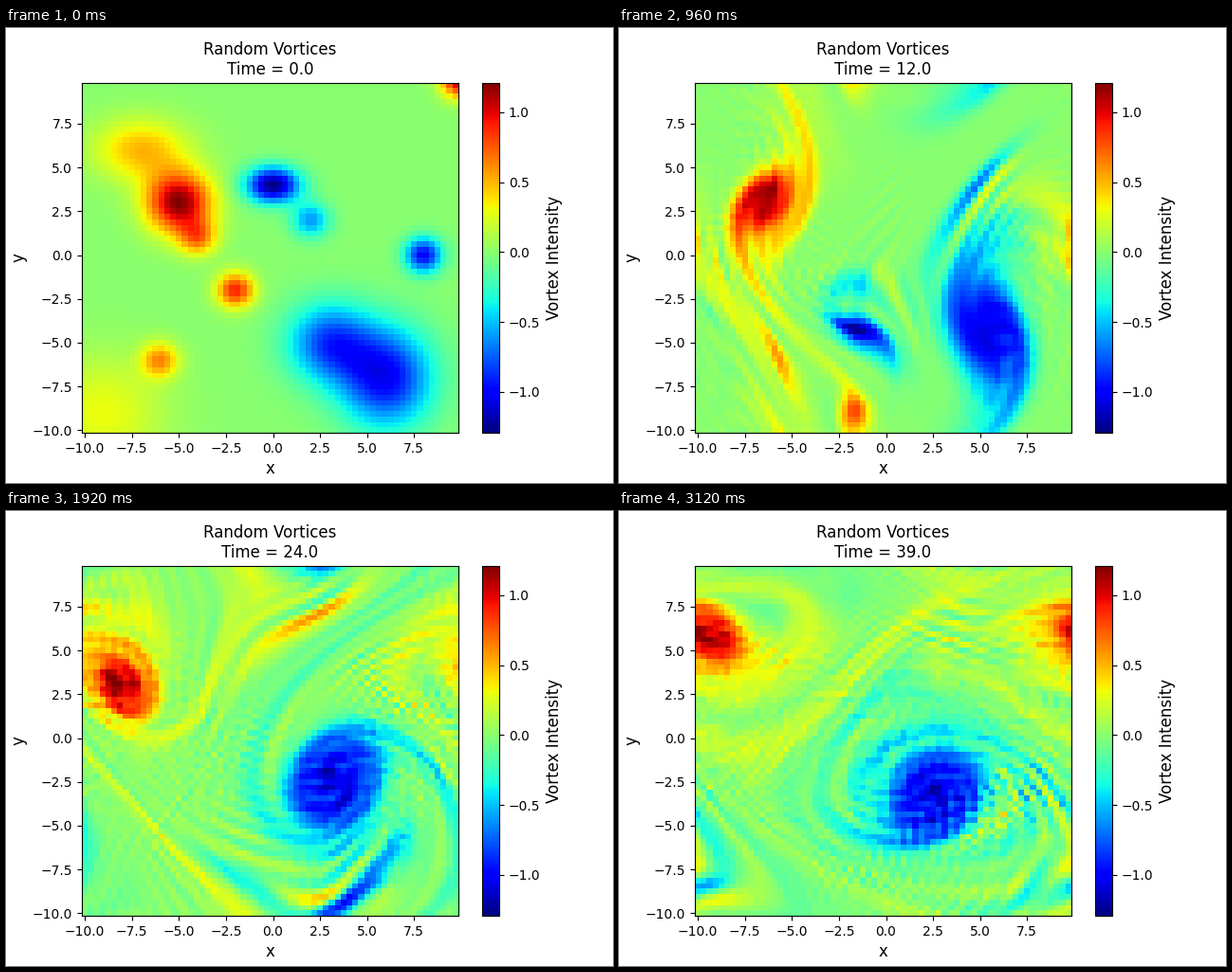
A matplotlib script that plays this animation: 640 by 480 pixels, repeating every 3.2 s.

```python
import numpy as np
import matplotlib.pyplot as plt
from matplotlib.animation import FuncAnimation

N, LENGTH, NU = 64, 20.0, 0.001
FRAMES, STEPS = 40, 12
DX = LENGTH / N
x = -LENGTH / 2 + DX * np.arange(N)
X, Y = np.meshgrid(x, x)

k = 2 * np.pi * np.fft.fftfreq(N, DX)
K2 = k[None, :] ** 2 + k[:, None] ** 2
K2[0, 0] = 1.0


def vortex(x0, y0, strength, a=1, b=1):
    return strength * np.exp(-(X - x0) ** 2 / a - (Y - y0) ** 2 / b)


def initial_field():
    w = vortex(-5, 3, 1.2, 3, 3) + vortex(-4, 1, 0.6)
    w += vortex(-7, 6, 0.5, 6, 3) + vortex(-9, -9, 0.3, 10, 10)
    w += vortex(-2, -2, 0.9) + vortex(-6, -6, 0.6) + vortex(10, 10, 1.2)
    w -= vortex(6, -7, 1.0, 6, 8) + vortex(3, -5, 0.8, 5, 5)
    w -= vortex(0, 4, 1.3, 2, 1) + vortex(2, 2, 0.6) + vortex(8, 0, 1.0)
    return w


def diff(f, axis):
    return (np.roll(f, -1, axis) - np.roll(f, 1, axis)) / (2 * DX)


def laplacian(f):
    around = sum(np.roll(f, s, a) for s in (-1, 1) for a in (0, 1))
    return (around - 4 * f) / DX ** 2


def stream(w):
    hat = -np.fft.fft2(w) / K2
    hat[0, 0] = 0
    return np.fft.ifft2(hat).real


def rate(w):
    psi = stream(w)
    turn = diff(psi, 1) * diff(w, 0) - diff(psi, 0) * diff(w, 1)
    return turn + NU * laplacian(w)


def rk4(w, dt):
    a = rate(w)
    b = rate(w + dt / 2 * a)
    c = rate(w + dt / 2 * b)
    d = rate(w + dt * c)
    return w + dt / 6 * (a + 2 * b + 2 * c + d)


def simulate():
    w = initial_field()
    fields = [w]
    for _ in range(FRAMES - 1):
        for _ in range(STEPS):
            w = rk4(w, 1 / STEPS)
        fields.append(w)
    return fields


fields = simulate()

fig, ax = plt.subplots(figsize=(6.4, 4.8), dpi=100)
mesh = ax.pcolormesh(x, x, fields[0], shading="nearest", cmap="jet")
bar = fig.colorbar(mesh, ax=ax)
bar.set_label("Vortex Intensity", fontsize=12)
ax.set_xlabel("x", fontsize=12)
ax.set_ylabel("y", fontsize=12)
title = ax.set_title("Random Vortices\nTime = 0.0", fontsize=12)


def update(i):
    mesh.set_array(fields[i])
    title.set_text(f"Random Vortices\nTime = {i:.1f}")
    return mesh, title


anim = FuncAnimation(fig, update, frames=FRAMES, interval=80,
                     repeat=True, repeat_delay=0, blit=False)
plt.show()
```
